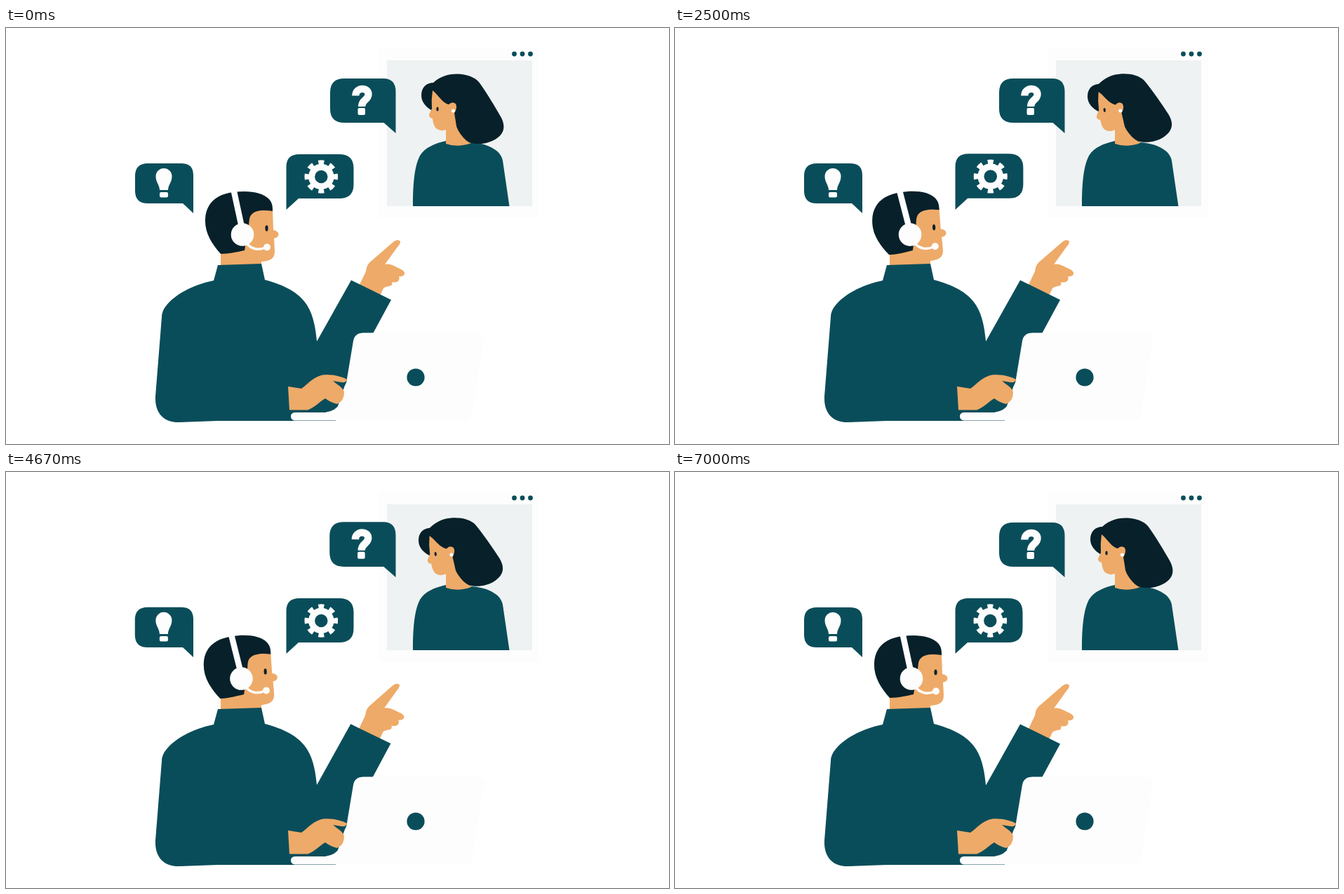
Animation, 945 px wide and 593 px high, one loop 7030 ms. Source, as an HTML page:

```html
<!DOCTYPE html>
<html lang="en">
<head>
<meta charset="utf-8">
<title>Support call</title>
<style>
  html, body { margin: 0; width: 100%; height: 100%; overflow: hidden; background: #fff; }
  svg { display: block; width: 100%; height: 100%; }
  .teal { fill: #0a4d5a; }
  .dark { fill: #07202a; }
  .skin { fill: #eeaa68; }
  .pale { fill: #fdfdfd; }
  .line { fill: none; stroke: #fdfdfd; }
</style>
</head>
<body>
<svg viewBox="0 0 945 593">
  <!-- video window -->
  <rect class="pale" x="532" y="27" width="228" height="244"/>
  <rect x="543" y="46" width="207" height="208" fill="#eff2f2"/>
  <g class="teal">
    <circle cx="724.5" cy="37" r="3.4"/><circle cx="736" cy="37" r="3.4"/><circle cx="747.5" cy="37" r="3.4"/>
  </g>

  <!-- caller -->
  <path class="teal" d="M580 254C580 223 582 197 590 182C597 170 613 164 627 161Q645 168 663 163C690 165 706 176 708 189L717.5 254Z"/>
  <path class="skin" d="M627 135V165Q644 171 663 164L648 125Z"/>
  <g id="caller">
    <path class="dark" d="M592 96C592 84 600 78 609 78C620 68 632 65.5 643 65.5C657 66 668 70 674 77C685 92 697 112 706 128C713 142 709 152 697 159C687 165 672 167 660 163C648 156 640 140 634 118L606 117C598 112 592 105 592 96Z"/>
    <path class="skin" d="M608 89Q606 102 607 115Q604 120 603 124Q603 128 608 129Q609 139 613 143Q619 148 627 145L643 146L639 121Q644 114 641 108Q636 104 631 109L628 108C619 103 615 94 608 89Z"/>
    <ellipse class="dark" cx="615" cy="115.5" rx="1.6" ry="3"/>
    <circle cx="637.5" cy="118" r="2.6" fill="#fff"/>
  </g>

  <!-- speech bubbles -->
  <g id="question">
    <path class="teal" d="M482 72H538Q555.5 72 555.5 91V150L538.5 135H482Q462 135 462 115V92Q462 72 482 72Z"/>
    <path class="line" stroke-width="10.3" d="M498.3 96.5C498.5 84 517 84 516.5 95C516 103 507 102 507 112"/>
    <rect class="pale" x="501.5" y="114" width="10.5" height="10" rx="2"/>
  </g>
  <g id="bulb">
    <path class="teal" d="M202 193H250Q267 193 267 210V264L252 250H202Q184 250 184 232V211Q184 193 202 193Z"/>
    <path class="pale" d="M219 231C219 224 213.5 220 213.5 211.5A11.5 11.5 0 0 1 236.5 211.5C236.5 220 231 224 231 231Z"/>
    <rect class="pale" x="219" y="234" width="12" height="7.5" rx="2"/>
  </g>
  <g id="gear">
    <path class="teal" d="M418 180H475Q495.5 180 495.5 200V223Q495.5 243 475 243H417L399.5 259V198Q399.5 180 418 180Z"/>
    <circle class="line" cx="449.3" cy="212" r="13.7" stroke-width="9"/>
    <circle class="line" cx="449.3" cy="212" r="20.3" stroke-width="7" pathLength="16" stroke-dasharray="1" stroke-dashoffset=".5"/>
  </g>

  <!-- agent -->
  <path class="skin" d="M306 318V340H364V322Z"/>
  <g id="agent">
    <path class="skin" d="M352 261L380 259L381 288C386 289 390 292 388 296C387 299 384 299 382 300L383 318C383 328 378 332 364 333L312 333V320L330 290Z"/>
    <path class="dark" d="M306 322C293 307 283 292 284 272C285 248 303 236 325 234C345 231 366 234 375 244C380 250 380 255 380 261C368 259 357 260 352 264C346 268 347 275 346 281L340 317C330 319 318 322 306 322Z"/>
    <path class="line" stroke-width="8.5" d="M325 233L336 284"/>
    <circle class="pale" cx="337" cy="294.5" r="16.3"/>
    <path class="line" stroke-width="3.5" d="M344 308C351 316 361 317 370 313"/>
    <circle class="pale" cx="372" cy="312.5" r="5"/>
    <ellipse id="eye" class="dark" cx="371.5" cy="285.5" rx="2.1" ry="4.2"/>
  </g>
  <path class="teal" d="M302 338L364 336L369 359C395 366 417 376 429 395C439 411 441 429 443 446L486 500L470 548V560H302L246 562C224 562 212 548 213 525L222 412Q222 403 229 395C243 378 270 365 296 360Z"/>
  <g id="arm">
    <path class="skin" d="M502 370L513 347C514 338 517 335 522 331L552 305Q558 300 562 304Q562 308 558 312L540 337C548 335 556 341 563 344Q569 347 568 351Q565 355 560 354Q562 360 557 362Q553 363 550 362Q552 367 546 368C542 369 540 369 538 371L530 388Z"/>
    <path class="teal" d="M492 359.5L549 387.5L480 515L464 535L430 470Z"/>
  </g>

  <!-- laptop -->
  <path class="pale" d="M510 434.5H672Q682 435 681 446L664 552Q662 559.5 654 559.5H412Q406 559 406 553.5Q406 548 413 548H455Q470 546 476 535Q483 520 486 500L495 446Q497 434.5 510 434.5Z"/>
  <circle class="teal" cx="584" cy="498" r="12.6"/>
  <path class="skin" d="M402 511L421 514C430 508 438 497 452 494.5C465 493 480 497 486 501Q485 506 478 505L466 503C474 510 480 512 482 519Q482 532 472 536Q463 534 455 528C448 532 440 541 430 544.5H404Z"/>
</svg>
<script>
const CYCLE = 3515; // the movement repeats twice per 7030 ms loop
const $ = id => document.getElementById(id);

const ramp = (t, from, to) => {
  const u = Math.min(1, Math.max(0, (t - from) / (to - from)));
  return u * u * (3 - 2 * u);
};
const hold = (t, a, b, c, d) => ramp(t, a, b) - ramp(t, c, d);
const pulse = (t, peak, half) => hold(t, peak - half, peak, peak, peak + half);

function rotate(id, angle, x, y) {
  $(id).setAttribute("transform", `rotate(${angle} ${x} ${y})`);
}

function grow(id, amount, x, y) {
  const s = 1 + 0.1 * amount;
  $(id).setAttribute("transform", `translate(${x} ${y}) scale(${s}) translate(${-x} ${-y})`);
}

function draw(now) {
  const t = now % CYCLE;
  grow("question", pulse(t, 710, 540), 555.5, 150);
  grow("bulb", pulse(t, 1660, 560), 267, 264);
  grow("gear", pulse(t, 2060, 540), 399.5, 259);
  rotate("arm", -4.1 * pulse(t, 680, 560), 447, 525);
  rotate("agent", -4.7 * hold(t, 900, 1500, 2200, 2800), 338, 343);
  rotate("caller", -3.6 * hold(t, 100, 650, 2740, 3300), 636, 160);
  const blink = pulse(t, 3395, 110) + pulse(t, 620, 110);
  $("eye").setAttribute("ry", 4.2 - 3.2 * blink);
}

const start = performance.now();
function frame() {
  draw(performance.now() - start);
  requestAnimationFrame(frame);
}
frame();
</script>
</body>
</html>
```
